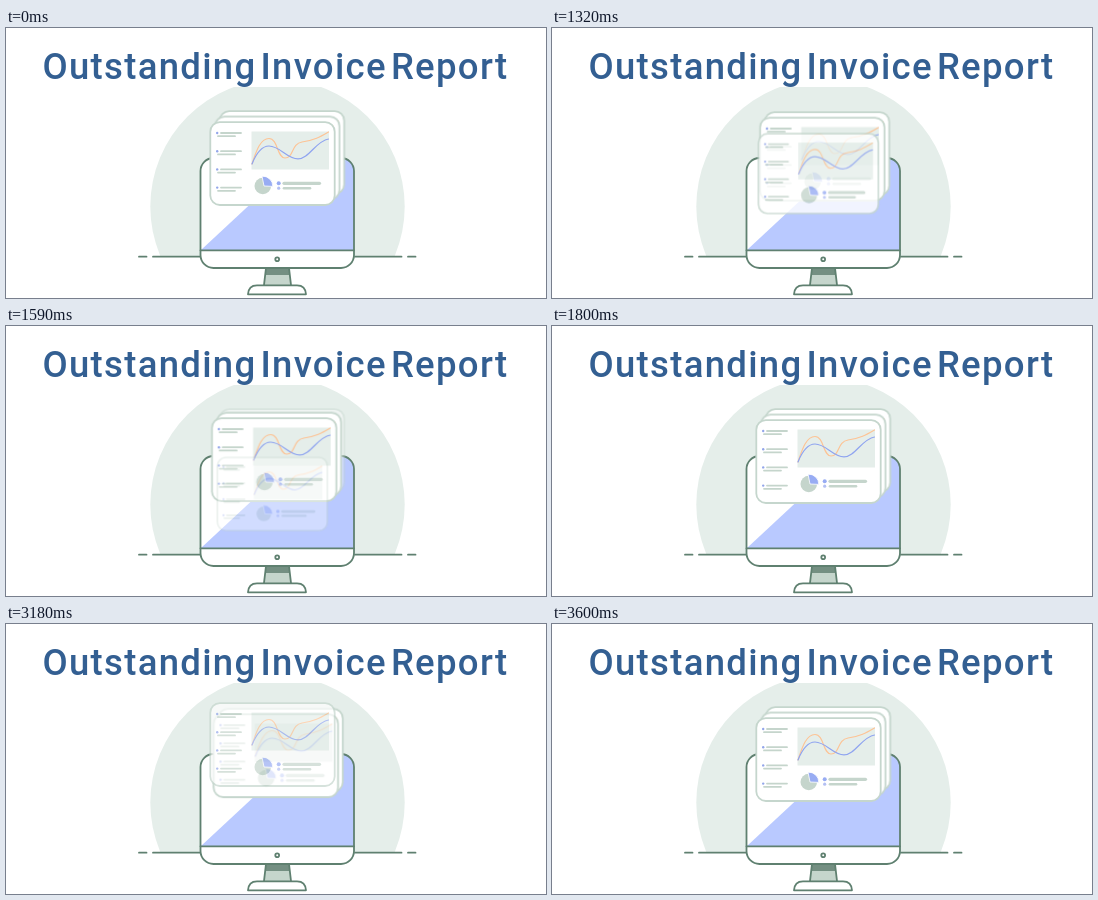
Write an HTML page without scripts that moves like this. It is 540 px wide and 270 px high and loops after 4.2 s.

```html
<!DOCTYPE html>
<html lang="en">
<head>
<meta charset="utf-8">
<title>Outstanding Invoice Report</title>
<style>
  html, body { margin: 0; width: 100%; height: 100%; overflow: hidden; background: #fff; }
  svg { display: block; width: 100%; height: 100%; }

  .title { font: 500 36.5px Roboto, Inter, sans-serif; letter-spacing: 1.3px; fill: #335f92; animation: hop 4.2s step-end infinite; }
  .ink { stroke: #5f8070; stroke-width: 1.8; stroke-linecap: round; stroke-linejoin: round; fill: #fff; }
  .open { fill: none; }
  .sage { stroke: #c5d5cc; stroke-linecap: round; fill: none; }
  .line { fill: none; stroke-width: 1.2; stroke-linecap: round; }

  /* Cards shift in 30 ms steps: 20 per transition, the front one settles after 14. */
  .front { transform-origin: 266px 135.5px; animation: leave 4.2s steps(14) infinite, fade 4.2s steps(20) infinite; }
  .middle, .back { animation: advance 4.2s steps(20) infinite; }
  .next { animation: appear 4.2s linear infinite; }

  @keyframes leave {
    0%, 28.571% { transform: translateY(0) scale(1); }
    38.571%, 42.856% { transform: translateY(35px) scale(.875); }
    42.857%, 71.428% { transform: translateY(0) scale(1); }
    81.428%, 85.713% { transform: translateY(-35px) scale(1); }
    85.714%, 100% { transform: translateY(0) scale(1); }
  }
  @keyframes fade {
    0%, 28.571% { opacity: 1; }
    42.856% { opacity: 0; }
    42.857%, 71.428% { opacity: 1; }
    85.713% { opacity: 0; }
    85.714%, 100% { opacity: 1; }
  }
  @keyframes advance {
    0%, 28.571% { transform: translate(0, 0); }
    42.856% { transform: translate(-4.75px, 5.5px); }
    42.857%, 71.428% { transform: translate(0, 0); }
    85.713% { transform: translate(-4.75px, 5.5px); }
    85.714%, 100% { transform: translate(0, 0); }
  }
  @keyframes appear {
    0%, 35.7% { opacity: 0; }
    41.4%, 42.856% { opacity: 1; }
    42.857%, 81.4% { opacity: 0; }
    85.713% { opacity: 1; }
    85.714%, 100% { opacity: 0; }
  }
  @keyframes hop {
    0% { transform: translateY(0); }
    71.428% { transform: translateY(-13px); }
    72.142%, 100% { transform: translateY(0); }
  }
</style>
</head>
<body>
<svg viewBox="0 0 540 270">
  <defs>
    <clipPath id="view"><rect y="59" width="540" height="211"/></clipPath>
    <clipPath id="disc"><rect y="59" width="540" height="170"/></clipPath>
    <clipPath id="screen"><rect x="194.5" y="130" width="153.5" height="110" rx="13"/></clipPath>

    <g id="item">
      <path class="sage" stroke-width="1.8" d="M215 105H235M212 108.2H229"/>
      <circle cx="211.2" cy="105" r="1.2" fill="#93a6ea"/>
    </g>

    <g id="card">
      <rect x="204.3" y="94.2" width="124.4" height="82.8" rx="9.5" fill="#fff" stroke="#c5d6cd" stroke-width="1.8"/>
      <use href="#item"/>
      <use href="#item" y="18.2"/>
      <use href="#item" y="36.4"/>
      <use href="#item" y="54.6"/>

      <rect x="245.5" y="103.5" width="77.5" height="38" fill="#e5eeea"/>
      <path class="line" stroke="#fdc496" d="M246 136C250 124 254 110.5 263 110.5C272 110.500 271 130 279 130C288 130 285 115.500 296 114C308 112.500 314 109 322.500 104"/>
      <path class="line" stroke="#8fa4f0" d="M246 136C250 126 255 118 263 118C274 118 281 130.800 292 130.800C303 130.800 310 113 322.500 111"/>

      <circle cx="256.800" cy="158" r="8.300" fill="#c5d5cc"/>
      <path d="M258 158L256 148.200A10 10 0 0 1 266.800 158.400Z" fill="#98acf3" stroke="#fff" stroke-width=".8"/>
      <circle cx="272.700" cy="155.300" r="2" fill="#98acf3"/>
      <circle cx="272.700" cy="160.200" r="1.600" fill="#b4c0f3"/>
      <path class="sage" stroke-width="3.200" d="M278 155.300H313.500"/>
      <path class="sage" stroke-width="2.600" d="M278 160.200H304"/>
    </g>
  </defs>

  <rect width="540" height="270" fill="#fff"/>
  <circle cx="271.500" cy="178.500" r="127.200" fill="#e5eeea" clip-path="url(#disc)"/>
  <path class="ink" d="M133 228.700H140.500M147 228.700H194M349 228.700H395.500M402 228.700H409.500"/>

  <!-- Monitor -->
  <path d="M260 240H283L285 257H258Z" fill="#c5d5cc"/>
  <path d="M260 240H283L283.800 247H259.200Z" fill="#748f82"/>
  <path class="ink open" d="M260 240L258 257M283 240L285 257"/>
  <path class="ink" d="M242 266.300Q242.500 257.300 251 257.300H291Q299.500 257.300 300 266.300Z"/>
  <g clip-path="url(#screen)">
    <rect x="194" y="130" width="155" height="111" fill="#fff"/>
    <path d="M195 222L294 130H349V222Z" fill="#b9c9ff"/>
  </g>
  <path class="ink" d="M194.500 222.300H348"/>
  <rect class="ink open" x="194.500" y="130" width="153.500" height="110" rx="13"/>
  <circle class="ink" cx="271.200" cy="231.200" r="1.900"/>

  <g clip-path="url(#view)">
    <use class="next" href="#card" x="9.500" y="-11"/>
    <use class="back" href="#card" x="9.500" y="-11"/>
    <use class="middle" href="#card" x="4.750" y="-5.500"/>
    <use class="front" href="#card"/>
  </g>

  <text class="title" y="51"><tspan x="36.500">Outstanding</tspan> <tspan x="254.500">Invoice</tspan> <tspan x="385">Report</tspan></text>
</svg>
</body>
</html>
```
